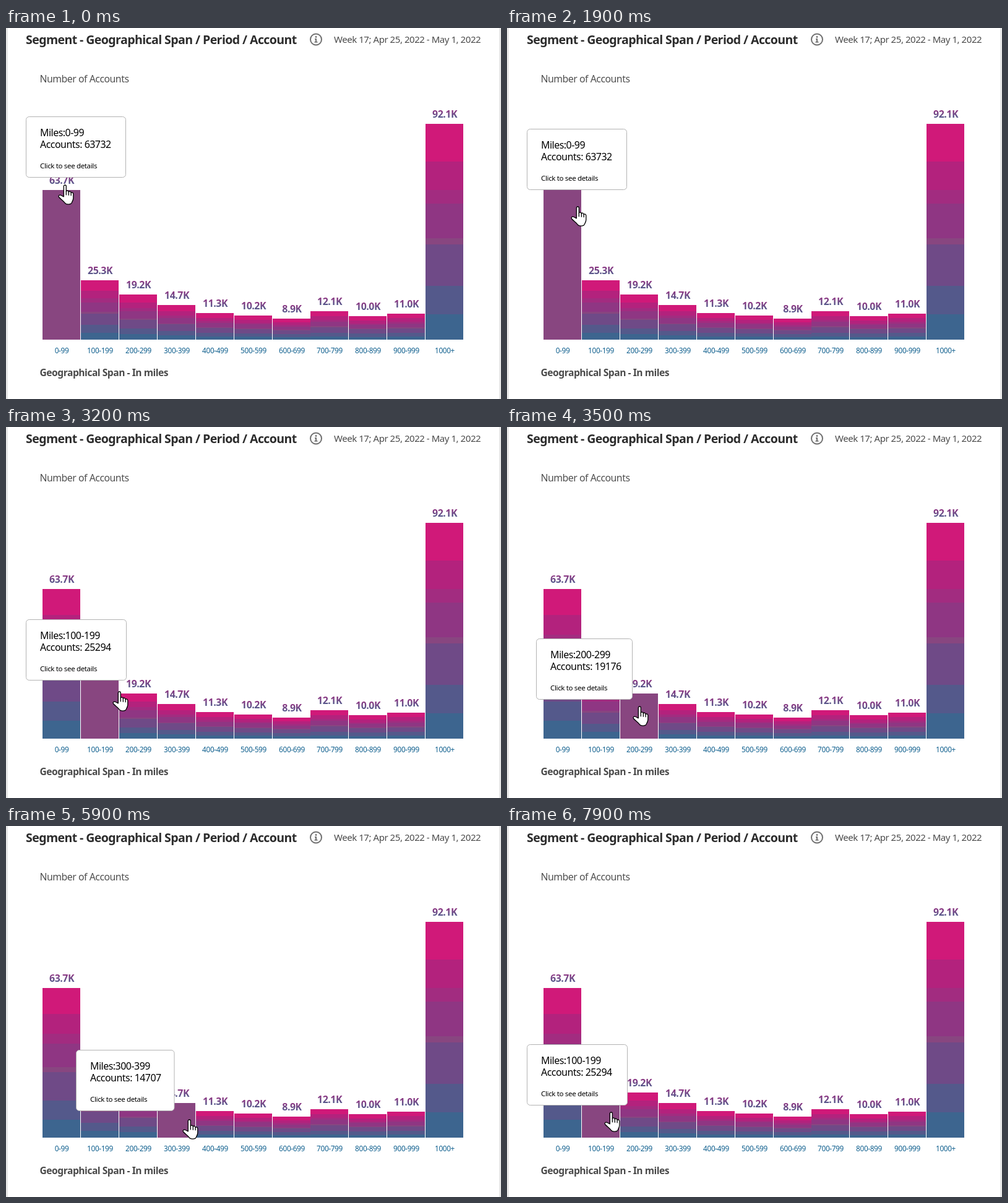
Recreate the animation shown at these times as an HTML page with a canvas. Size 800 by 600 pixels, loop 8 s.

```html
<!DOCTYPE html>
<html lang="en">
<head>
<meta charset="utf-8">
<title>Geographical span chart</title>
<style>
html, body { margin: 0; width: 100%; height: 100%; overflow: hidden; background: #fff; }
canvas { display: block; width: 800px; height: 600px; }
</style>
</head>
<body>
<canvas id="stage" width="800" height="600"></canvas>
<script>
const ctx = document.getElementById('stage').getContext('2d');
const FONT = '"Noto Sans", "Open Sans", sans-serif';
const TRACKING = -.03;
const LOOP = 8000, STEP = 100, LAG = 85;
const BASE = 504, LEFT = 59.1, PITCH = 61.9, BAR_W = 61, PER_K = 3.785;
const HOVER = '#884680';

const thousands = [63.7, 25.3, 19.2, 14.7, 11.3, 10.2, 8.9, 12.1, 10, 11, 92.1];
const accounts = [63732, 25294, 19176, 14707, 11277];
const boxWidths = [161, 162, 155, 158.5, 155.5];

// Lower edge of each colour band, as a share of the bar height
const bands = [
  [.175, '#d01979'], [.307, '#b3227d'], [.37, '#a22c80'], [.53, '#8f3683'],
  [.56, '#884680'], [.75, '#6f4a87'], [.882, '#54598b'], [1, '#3d658f']
];

// start, end, x, y, easing power
const START = [85, 251.7];
const moves = [
  [-100, 300, 88, 271, 2],
  [500, 700, 89, 236.5, 1],
  [900, 1200, 90, 252, 2],
  [1300, 1600, 96, 269, 1],
  [1800, 2600, 162, 419, 1],
  [3100, 3500, 204, 451, 1],
  [4400, 4700, 243, 463, 1],
  [5600, 6000, 300, 477.5, 1],
  [7100, 7600, 193, 465, 1.7],
  [7700, 7900, 158, 462, 1]
];

function pointer(t, lag) {
  let [x, y] = START;
  for (const [start, end, toX, toY, power] of moves) {
    if (t <= start) break;
    const time = t >= end ? end : Math.max(start, t - lag);
    const k = ((time - start) / (end - start)) ** power;
    x += (toX - x) * k;
    y += (toY - y) * k;
  }
  return { x, y };
}

function text(str, x, y, size, color, weight = 400, align = 'left') {
  ctx.font = `${weight} ${size}px ${FONT}`;
  ctx.letterSpacing = size * TRACKING + 'px';
  ctx.textAlign = align;
  ctx.fillStyle = color;
  ctx.fillText(str, x, y);
}

const rangeName = i => i === 10 ? '1000+' : i === 0 ? '0-99' : `${i}00-${i}99`;

function drawBar(i, hovered) {
  const x = Math.round(LEFT + PITCH * i);
  const top = Math.round(BASE - .4 - thousands[i] * PER_K);
  const middle = x + BAR_W / 2 + .5;
  if (hovered) {
    ctx.fillStyle = HOVER;
  } else {
    const fill = ctx.createLinearGradient(0, top, 0, BASE);
    let from = 0;
    for (const [to, color] of bands) {
      fill.addColorStop(from, color);
      fill.addColorStop(to, color);
      from = to;
    }
    ctx.fillStyle = fill;
  }
  ctx.fillRect(x, top, BAR_W, BASE - top);

  const ink = ctx.createLinearGradient(0, top - 22, 0, top - 10);
  ink.addColorStop(0, '#8f3683');
  ink.addColorStop(1, '#54598b');
  text(thousands[i].toFixed(1) + 'K', middle, top - 10, 15.9, ink, 700, 'center');
  text(rangeName(i), middle, 526, 11.8, '#12618f', 400, 'center');
}

function drawInfoIcon(x, y) {
  ctx.strokeStyle = ctx.fillStyle = '#6e6e6e';
  ctx.lineWidth = 2;
  ctx.beginPath();
  ctx.arc(x, y, 9, 0, Math.PI * 2);
  ctx.stroke();
  ctx.beginPath();
  ctx.arc(x, y - 4, 1.4, 0, Math.PI * 2);
  ctx.fill();
  ctx.fillRect(x - 2, y - 1.5, 3, 1.6);
  ctx.fillRect(x - 1, y - 1.5, 2, 6);
  ctx.fillRect(x - 2.5, y + 3.5, 5, 1.6);
}

function drawTooltip(bar, p) {
  const w = boxWidths[bar];
  const x = Math.max(32.5, Math.round(p.x - 2 - w) + .5);
  const y = Math.round(p.y - 109) + .5;
  ctx.beginPath();
  ctx.roundRect(x, y, w, 98, 5);
  ctx.fillStyle = '#fff';
  ctx.fill();
  ctx.strokeStyle = '#b3b3b3';
  ctx.lineWidth = 1;
  ctx.stroke();
  text('Miles:' + rangeName(bar), x + 22.5, y + 31.5, 15.9, '#000');
  text('Accounts: ' + accounts[bar], x + 22.5, y + 50.5, 15.9, '#000');
  text('Click to see details', x + 22.5, y + 83.5, 11.5, '#000');
}

const hand = new Path2D(`M9 19.5 V2.8 C9 0 13 0 13 2.8 V11
  C13.5 9.2 16.8 9.6 17 11.8 C17.8 10.3 20.6 10.9 20.8 13.2
  C21.8 12 24.5 12.8 24.5 15.3 V21.5 C24.5 26 22.5 27 22 29.2
  C20.5 32.6 12.5 32.6 10.8 29.5 C8 25.5 4.5 24 1.2 20.2
  C-.4 17.8 2.3 16.2 4.4 17.2 Z`);
const knuckles = new Path2D('M13 11 V16.5 M17 12 V17 M20.8 13.5 V17.5');

function drawHand(p) {
  ctx.save();
  ctx.translate(Math.round(p.x) - .7, Math.round(p.y) + .3);
  ctx.lineJoin = ctx.lineCap = 'round';
  ctx.fillStyle = '#fff';
  ctx.strokeStyle = '#000';
  ctx.lineWidth = 1.3;
  ctx.fill(hand);
  ctx.stroke(hand);
  ctx.stroke(knuckles);
  ctx.restore();
}

function draw(t) {
  ctx.fillStyle = '#fff';
  ctx.fillRect(0, 0, 800, 600);
  ctx.fillStyle = '#e8e8e8';
  ctx.fillRect(0, 0, 3, 600);
  ctx.fillRect(797, 0, 3, 600);

  text('Segment - Geographical Span / Period / Account', 32, 26, 19.55, '#2c2c2c', 700);
  drawInfoIcon(501, 18.5);
  text('Week 17; Apr 25, 2022 - May 1, 2022', 530, 24, 15, '#4b4b4b');
  text('Number of Accounts', 54.5, 88, 15.8, '#505050');
  text('Geographical Span - In miles', 54.5, 563, 15.6, '#4b4b4b', 700);

  // Tooltip and highlight trail the hand while it moves
  const trail = pointer(t, LAG);
  const hovered = Math.floor((trail.x + 11 - LEFT) / PITCH);
  thousands.forEach((_, i) => drawBar(i, i === hovered));
  drawTooltip(hovered, trail);
  drawHand(pointer(t, 0));
}

function frame() {
  const t = performance.now() % LOOP;
  draw(Math.floor(t / STEP) * STEP);
  requestAnimationFrame(frame);
}
frame();
</script>
</body>
</html>
```
